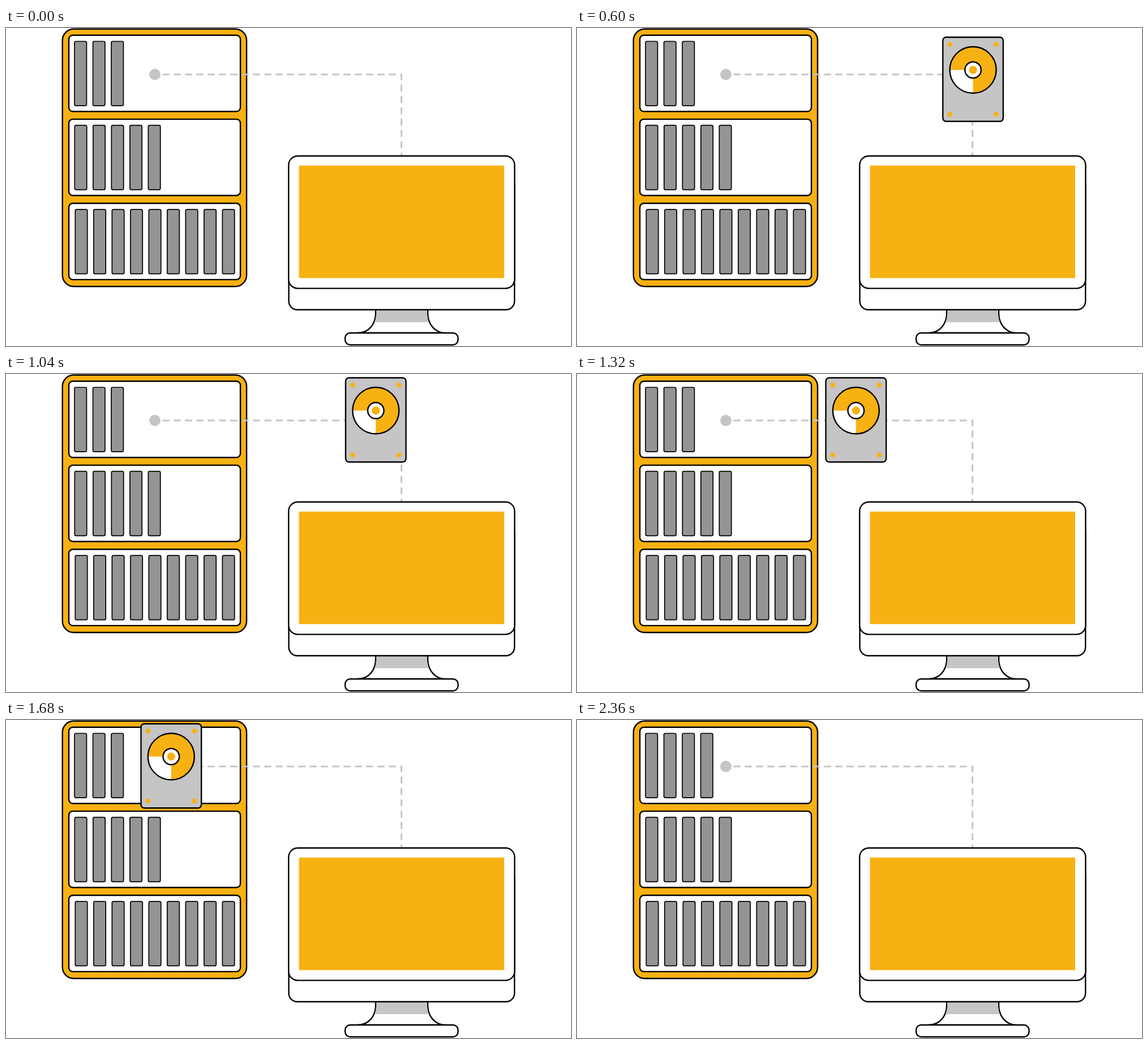
These frames come from a looping animation (998 by 561 pixels, 3 s). An HTML page:

```html
<!DOCTYPE html>
<html lang="en">
<head>
<meta charset="utf-8">
<title>Drive to rack</title>
<style>
  html, body { margin: 0; width: 100%; height: 100%; overflow: hidden; background: #fff; }
  svg { display: block; width: 998px; height: 561px; }
  .line { stroke: #000; stroke-width: 2.4; }
  .white { fill: #fff; }
  .gold { fill: #f8b112; }
  .grey { fill: #c5c5c5; }
  .book { fill: #949494; stroke: #000; stroke-width: 1.7; }
  .cable { fill: none; stroke: #c5c5c5; stroke-width: 3; stroke-linecap: round; stroke-dasharray: 10 10; }
</style>
</head>
<body>
<svg viewBox="0 0 998 561">
  <rect class="gold line" x="99.7" y="1.7" width="325.3" height="454.3" rx="20"/>
  <g id="shelves"></g>

  <path class="cable" d="M277.5 82H698.5V226"/>
  <circle class="grey" cx="263" cy="82" r="10"/>

  <g id="drive">
    <rect class="grey line" x="-53.3" y="-57.8" width="106.6" height="148.6" rx="6"/>
    <g id="screws"></g>
    <circle class="gold" r="41"/>
    <path class="white" d="M0 0H-41A41 41 0 0 0 0 41Z"/>
    <circle class="line" r="41" fill="none"/>
    <circle class="white line" r="14.3"/>
    <circle class="gold" r="7.2"/>
  </g>

  <path class="white line" d="M653 497V503C653 522 641 538 621 538H777C757 538 745 522 745 503V497Z"/>
  <path class="grey" d="M654 497H744V505Q744.5 513 747 519H651Q653.5 513 654 505Z"/>
  <rect class="white line" x="599" y="538" width="199.5" height="21" rx="9"/>
  <rect class="white line" x="499.5" y="262" width="398.7" height="235" rx="15"/>
  <rect class="white line" x="499.2" y="225.8" width="399.2" height="233.6" rx="16"/>
  <rect class="gold" x="517.5" y="242.7" width="362.5" height="198.5"/>
</svg>
<script>
  const LOOP = 3000, STEP = 40;
  const $ = id => document.getElementById(id);

  function add(parent, tag, attrs) {
    const el = document.createElementNS('http://www.w3.org/2000/svg', tag);
    for (const key in attrs) el.setAttribute(key, attrs[key]);
    return parent.appendChild(el);
  }

  // Fills one shelf and returns its last book
  function shelf(y, count, x) {
    add($('shelves'), 'rect', { class: 'white line', x: 111, y, width: 303, height: 134.6, rx: 7 });
    let book;
    for (let i = 0; i < count; i++) {
      book = add($('shelves'), 'rect', {
        class: 'book', x: x + i * 32.5, y: y + 10.8, width: 21.4, height: 113.6, rx: 2.5
      });
    }
    return book;
  }

  const newBook = shelf(12.7, 4, 121);
  shelf(160.9, 5, 121.3);
  shelf(309.3, 9, 122.3);

  for (const x of [-41, 41])
    for (const y of [-45, 78.3])
      add($('screws'), 'circle', { class: 'gold', cx: x, cy: y, r: 4.4 });

  // Smooth ease in and out between two times
  function ease(t, start, end) {
    const u = Math.min(1, Math.max(0, (t - start) / (end - start)));
    return u * u * (3 - 2 * u);
  }

  function draw(now) {
    // Motion advances at 25 pictures per second
    const t = Math.floor((now % LOOP) / STEP + 1e-6) * STEP;
    const x = 699.5 - 437 * ease(t, 838, 1838);
    const y = 64.5 + 229 * (1 - ease(t, 0, 684));
    $('drive').setAttribute('transform', `translate(${x} ${y})`);
    $('drive').style.display = t < 2040 ? '' : 'none';
    newBook.style.display = t < 2360 ? 'none' : '';
  }

  let begin = null;
  function tick(now) {
    if (begin === null) begin = now;
    draw(now - begin);
    requestAnimationFrame(tick);
  }
  draw(0);
  requestAnimationFrame(tick);
</script>
</body>
</html>
```
